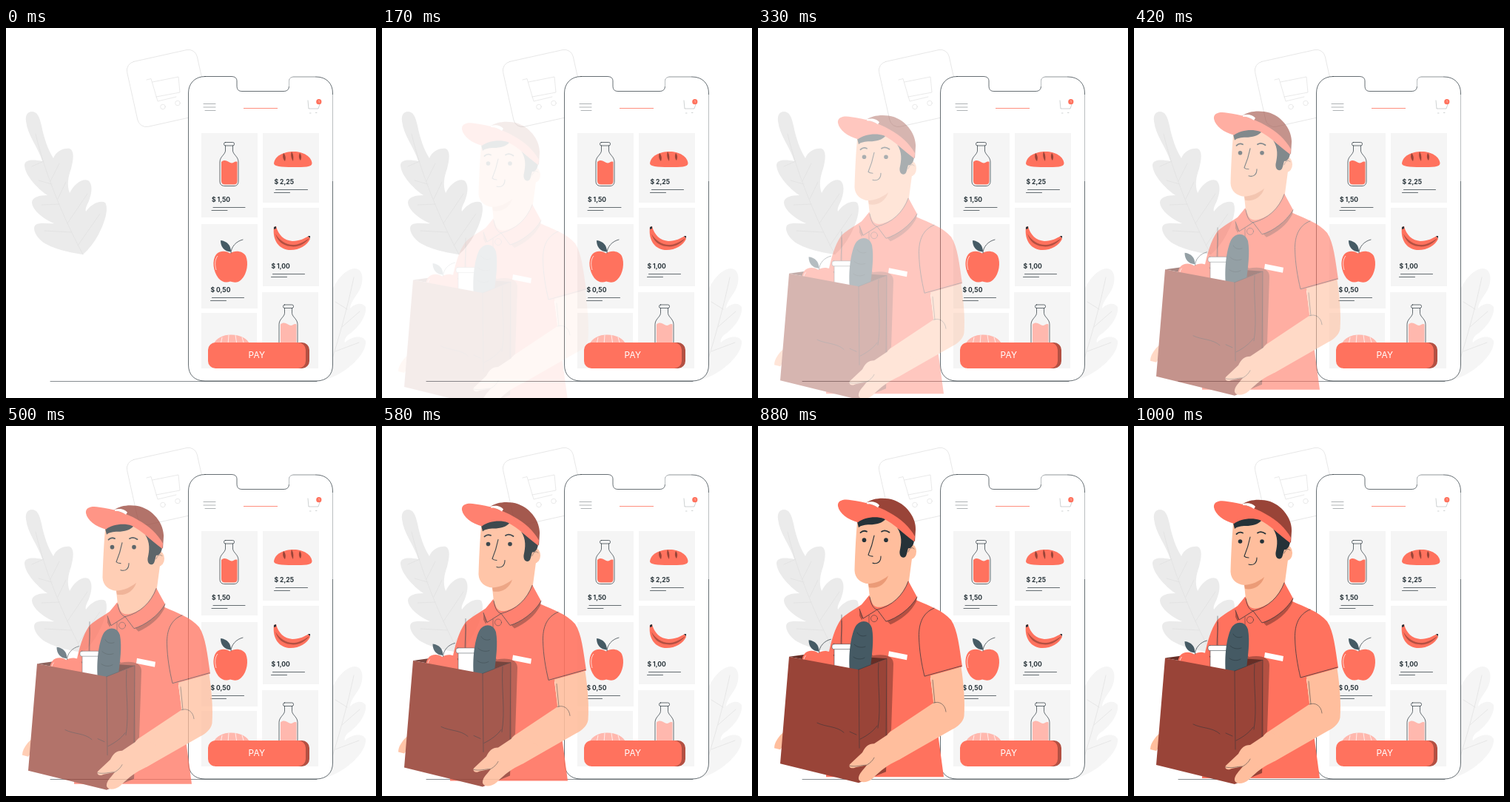
Write an HTML page that moves like this. It is 500 by 500 pixels and loops after 1040 ms.

```html
<!DOCTYPE html>
<html lang="en">
<head>
<meta charset="utf-8">
<title>Grocery delivery</title>
<style>
  html, body { margin: 0; width: 100%; height: 100%; overflow: hidden; background: #fff; }
  svg { display: block; width: 100vw; height: 100vh; }
  .line { fill: none; stroke: #263238; stroke-width: .7; stroke-linecap: round; stroke-linejoin: round; }
  .faint { fill: none; stroke: #e0e0e0; stroke-width: .7; stroke-linecap: round; stroke-linejoin: round; }
  .thin { stroke-width: .5; }
  .bold { stroke-width: 1.1; }
  .orange { fill: #ff725e; }
  .shade { fill: #b35042; }
  .brown { fill: #994438; }
  .dark { fill: #263238; }
  .slate { fill: #455a64; }
  .skin { fill: #ffbe9d; }
  .pale { fill: #ffb8ae; }
  .white { fill: #fff; }
  text { font-family: Inter, "Open Sans", sans-serif; }
  .price { font-size: 8.5px; font-weight: 700; fill: #263238; }
</style>
</head>
<body>
<svg viewBox="0 0 500 500">
  <defs>
    <g id="bottle">
      <path class="line" d="M296.500 159V166C296 171 289 174 289 181V207C289 212 292 213.500 296 213.500H308C312 213.500 314 211 314 207V181C314 174 307 171 306.500 166V159"/>
      <rect class="line" x="294.500" y="154.500" width="14" height="4.500" rx="2"/>
    </g>
    <path id="milk" d="M291 181C295 177 299 180 303 182C307 184 309 179 312.500 181V207C312.500 210 311 211.500 308 211.500H296C293 211.500 291 210 291 207Z"/>
    <g id="apple">
      <path class="orange" d="M303 304.500C309 300 320 301 324 308C328 317 326 332 318 340C313 345 308 344 303 342.500C297 345 291 343 287 338C280 329 278 314 284 306C289 300 298 301 303 304.500Z"/>
      <path class="slate" d="M304 302.500C295 302 290 296 290 287C299 288 304 294 304 302.500Z"/>
      <path class="line" d="M304 304C304 296 311 288 320 286"/>
      <path d="M284 327C282 320 282 313 286 308" fill="none" stroke="#fff" stroke-width=".7"/>
    </g>
  </defs>

  <!-- Backdrop -->
  <path fill="#ebebeb" d="M35 113C42 113 45 119 48 132C51 148 57 165 64 176C68 166 78 162 86 163C93 166 91 179 88 190C84 202 82 211 86 223C92 211 103 203 111 206C118 211 116 225 111 236C108 242 107 245 108 248C115 238 127 232 134 236C139 244 134 262 125 279C119 290 112 299 104 306C83 303 57 297 46 286C38 278 36 269 40 266C47 262 58 265 65 264C52 259 36 247 35 236C35 229 44 226 56 226C42 217 25 198 25 185C26 177 38 178 49 180C44 162 29 145 27 126C26 118 29 113 35 113Z"/>
  <path class="faint" d="M40 143C52 195 78 258 104 306M51 180L35 187M62 211L44 206M70 231L81 208M72 238L48 239M83 264L110 224M88 276L52 274M97 294L127 251M60 207L72 183"/>
  <rect class="faint" x="161" y="48" width="97" height="90" rx="12" transform="rotate(-12.500 161 48)"/>
  <path class="faint" d="M190 70L196 68.500L205 99L230 93M198 73L233 66L235 87L203 93"/>
  <circle class="faint" cx="212" cy="106.500" r="3.300"/>
  <circle class="faint" cx="232" cy="101.500" r="3.300"/>
  <path fill="#f5f5f5" d="M436 365C444 343 458 325 472 325C484 326 484 345 476 357C470 366 465 373 465 379C471 372 482 370 486 377C488 391 473 408 462 415C458 419 457 423 458 425C468 416 482 415 486 423C488 441 458 468 432 475Z"/>
  <path class="faint" d="M470 337C462 375 450 420 436 462M461 380L445 370M454 404L478 383M445 437L477 425"/>
  <path class="line" d="M60 477.500H420" stroke-opacity=".8"/>

  <!-- Phone -->
  <path class="line white" style="fill:#fff" d="M269 65.500H304C310 65.500 312 68 312 72V78C312 83 314 85.500 319 85.500H375C380 85.500 382.500 83 382.500 78V72C382.500 68 385 66 390 66H419C433 66 441.500 75 441.500 88V455C441.500 469 433 477 419 477H269C255 477 246.500 469 246.500 455V88C246.500 75 255 65.500 269 65.500Z"/>
  <path d="M382.500 79V72C382.500 68 385 66 390 66H418M441.500 90V207" fill="none" stroke="#fff" stroke-opacity=".55" stroke-width="1.200"/>
  <path class="line thin" stroke-opacity=".75" d="M267 102.500H283M267 107H283M269 111.500H283"/>
  <path d="M321 108.500H367" stroke="#ff725e" stroke-width=".8"/>
  <path class="line thin" stroke-opacity=".45" d="M408 98L409 109H422L424 103M410.500 115H412M418.500 114.500H420"/>
  <circle class="orange" cx="422.800" cy="99.700" r="3.600"/>
  <text x="422.800" y="101.300" font-size="4" fill="#fff" text-anchor="middle">1</text>
  <g id="cards" fill="#f5f5f5"></g>

  <use href="#milk" class="orange"/>
  <use href="#bottle"/>
  <g transform="translate(80 219.500)"><use href="#milk" class="pale"/><use href="#bottle"/></g>
  <use href="#apple"/>
  <path class="orange" d="M362 183C363 173 375 167 389 167C402 167 413 174 413.500 183C413 188 404 188 388 188C371 188 362 187 362 183Z"/>
  <path class="brown" d="M375 169C373 174 375 178 377 180C379 175 377 171 375 169ZM386 167C384 172 386 177 388 180C389 174 388 170 386 167ZM397 169C395 173 396 177 398 179C400 175 399 171 397 169Z"/>
  <path class="orange" d="M362 269L365 268C368 280 376 287 387 288C397 288 404 284 409 281L411 285C407 294 395 301 382 300C367 298 360 285 362 269Z"/>
  <path class="shade" d="M364 278C370 288 380 294 390 293C399 292 405 287 410 284C405 291 395 297 384 295C374 294 367 288 364 278Z"/>
  <path class="dark" d="M362 269L365 268L365 271L362 272ZM408 281L411 281L411 284Z"/>
  <path class="pale" d="M280 428C284 419 293 414.500 304 414.500C317 414.500 327 420 329.500 428Z"/>
  <path d="M292 418L290 428M301 415L300 428M310 415L312 428M319 418L322 428" stroke="#fff" stroke-width=".7"/>
  <g id="prices"></g>
  <rect class="shade" x="280" y="425" width="130" height="35" rx="10"/>
  <rect class="orange" x="273" y="425" width="132" height="35" rx="10"/>
  <text x="339" y="446.300" font-size="11.800" fill="#fff" text-anchor="middle" letter-spacing=".3">PAY</text>

  <g id="courier">
    <!-- Body -->
    <path class="skin" d="M34 416C27 422 22 430 22 437L30 439L37 430Z"/>
    <path class="orange" d="M140 243C128 251 117 257 112 263C104 275 99 291 95 312L92 476H251L233 342L276 327C272 300 270 278 261 264C250 251 232 245 214 237L203 211L150 231Z"/>
    <path class="skin" d="M233 339L274.500 327.500C278 350 280 375 278.500 394C277 402 270 408 262 412L190 453L150 434L237 376Z"/>
    <path class="skin" d="M134 132C132 154 131 180 130.500 197C131 208 139 214 149 215L151 234C154 246 161 248 168 246C187 241 200 228 204 211L208 181L210 157L172 126Z"/>
    <path fill="#eb9b77" d="M149 215C160 214 169 210 176 204C172 217 160 222 150 220Z"/>
    <path class="shade" d="M215 233L214 239C207 253 193 264 179 270L173 264ZM137 249L142 261L140 264L137 258Z"/>
    <path class="orange" d="M203 211L215 233C206 249 187 262 173 266L161 250C181 245 196 231 203 211ZM150 231L137 249L142 262L158 250Z"/>
    <path class="line" d="M215 233C206 249 187 262 173 266L161 250L142 262L137 249M151 233C153 245 157 249 161 250C181 245 196 231 203 212"/>
    <circle class="line thin" cx="157" cy="262" r="4.500"/>
    <path class="line thin" d="M150 258V304M113 265C114 275 112 284 112 296M236 345L239 376"/>
    <path class="line" d="M238 248C223 254 217 268 217.500 287C218 306 221 323 225 340L275 326"/>
    <path class="white" d="M177 306L202 311L201 318L176 313Z"/>

    <!-- Head -->
    <ellipse class="skin" cx="206.500" cy="171.500" rx="7.500" ry="10.500"/>
    <path class="line thin" d="M203 172C205 166 209 165 211 168"/>
    <path class="dark" d="M134 131C142 123 160 122 173 127C168 133 160 135 151 135C145 135 139 136 136 139ZM188 139L211 157C210 164 206 168 203 167C201 173 201 179 197 179.500C193 180 191 176 191.500 171C194 160 195 150 188 139Z"/>
    <path class="brown" d="M146 106C155 99 171 98 184 102C203 109 214 128 213 142L212 158C196 139 176 116 146 106Z"/>
    <path class="orange" d="M108 110C107 102 116 100 126 102C162 106 199 126 212 151L211 158C196 147 184 134 170 127C158 123 143 126 135 132C121 128 110 120 108 110Z"/>
    <path class="white" d="M147 105C154 103 161 105 164 109L162 112C158 109 153 107 147 107Z"/>
    <path class="line" style="stroke-width:1.800" d="M138.500 146C141 143.500 144 143 147 144.500M167 144.500C170 142.500 174 143 177.500 145.500"/>
    <circle class="dark" cx="143.500" cy="156" r="2.800"/>
    <circle class="dark" cx="173" cy="156" r="2.800"/>
    <path class="line bold" d="M157 150C155 160 152 169 149 176C151 178 153 178 155 178M155 187C162 189 166 185 166 178"/>

    <!-- Groceries -->
    <path class="shade" d="M150 304L155 312C172 309 183 313 183 323L180 413L170 424L172 318L150 318Z"/>
    <path fill="#662e26" d="M42 313.500L75 309L174 316L136 331Z"/>
    <use href="#apple" x="-221.500" y="4"/>
    <path class="white" d="M103 303H124C124 311 128 316 128 333H103Z"/>
    <rect class="line thin" style="fill:#fff" x="100" y="296.500" width="26.500" height="7" rx="2.500"/>
    <path class="line thin" d="M103 304V325M113 257V296"/>
    <path class="slate" d="M124 334C122 311 125 287 131 274C137 263 150 263 154 275C157 291 154 310 152 328L137 334Z"/>
    <path class="line thin" d="M134 281C136 285 141 287 146 285M130 297C134 301 140 302 145 300M129 314C133 317 139 318 144 315"/>
    <path class="brown" d="M42 313.500L136 331L174 316L175 420L173 469L136 484L30 458Z"/>
    <path class="line thin" d="M136 331L174 316L173 432M136 331L137 437M163 322C161 352 167 380 162 410M80 403C92 409 106 407 116 416M124 415L133 419M138 425C148 420 156 414 161 407"/>

    <!-- Front hand -->
    <path class="skin" d="M184 413L157 431C149 431 145 435 141 443L124 459C122 463 126 466 132 463L147 460C143 466 135 472 136 479C138 485 148 484 155 478C166 467 175 460 190 453L222 434Z"/>
    <path class="line thin" d="M124 461C132 463 140 460 147 460C152 457 155 454 157 450M237 376C245 373 253 378 254 388"/>
  </g>
</svg>
<script>
  const el = id => document.getElementById(id);
  const PERIOD = 1040, STEP = 1000 / 24, RISE = 30;

  const cards = [
    [264, 142, 76, 114], [347, 142, 76, 94], [264, 265, 76, 114],
    [347, 243, 76, 106], [264, 385, 75, 75], [346, 357, 76, 103]
  ];
  el("cards").innerHTML = cards.map(([x, y, w, h]) =>
    `<rect x="${x}" y="${y}" width="${w}" height="${h}"/>`).join("");

  const price = (label, x, y) =>
    `<text class="price" x="${x}" y="${y}">${label}</text>
     <path class="line" d="M${x + 2} ${y + 7.5}h43M${x} ${y + 11.5}h21"/>`;
  el("prices").innerHTML = price("$ 1,50", 278, 235) + price("$ 2,25", 362.5, 211)
    + price("$ 0,50", 276.5, 357) + price("$ 1,00", 358.5, 325);

  const bezier = (a, b, s) => 3 * (1 - s) ** 2 * s * a + 3 * (1 - s) * s * s * b + s ** 3;

  // Cubic-bezier easing that overshoots before settling.
  function ease(x) {
    let low = 0, high = 1;
    for (let i = 0; i < 24; i++) {
      const mid = (low + high) / 2;
      if (bezier(.36, .5, mid) < x) low = mid; else high = mid;
    }
    return bezier(-.01, 1.38, high);
  }

  const courier = el("courier");
  function render(time) {
    // The motion is stepped at 24 per second; the first steps stay hidden.
    const step = Math.floor((time % PERIOD + 3.4) / STEP);
    const progress = step < 3 ? 0 : ease(Math.min(1, step * STEP / 1000));
    courier.setAttribute("opacity", Math.max(0, Math.min(1, progress)));
    courier.setAttribute("transform", `translate(0 ${RISE * (1 - progress)})`);
  }

  const start = performance.now();
  function tick() {
    render(performance.now() - start);
    requestAnimationFrame(tick);
  }
  tick();
</script>
</body>
</html>
```
